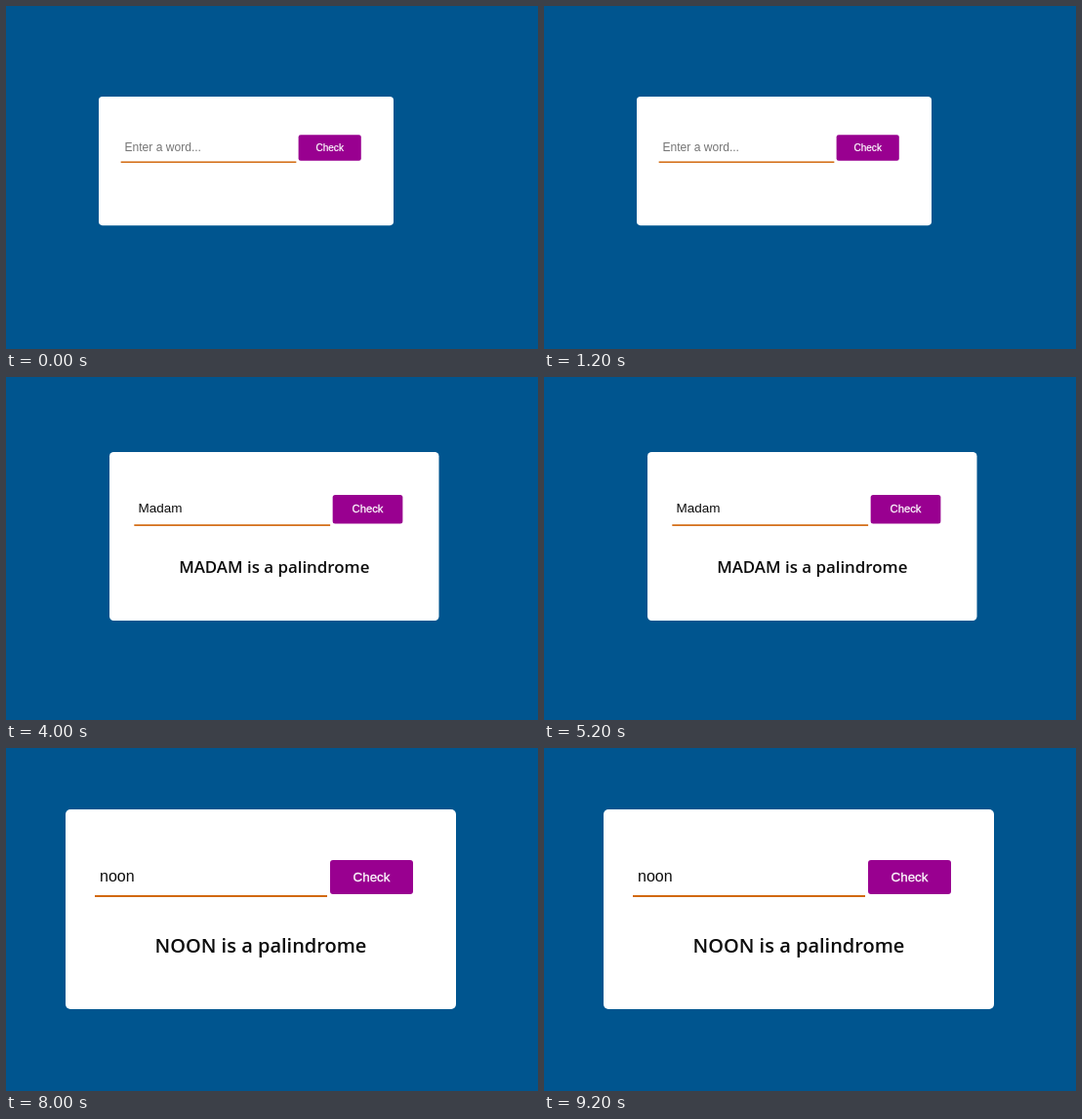
These frames come from a looping animation (545x352 px, 10 s). An HTML page:

```html
<!DOCTYPE html>
<html lang="en">
<head>
<meta charset="utf-8">
<title>Palindrome checker</title>
<style>
  html, body { margin: 0; width: 100%; height: 100%; overflow: hidden; background: #00558f; }
  svg { display: block; }
  text { font-family: "Liberation Sans", Arial, sans-serif; font-size: 16px; white-space: pre; }
  #button { font-size: 13.33px; fill: #fff; stroke: #fff; stroke-width: .3px; text-anchor: middle; }
  #result { font: 600 20px "Open Sans", sans-serif; fill: #0c0c0c; text-anchor: middle; }
</style>
</head>
<body>
<svg width="545" height="352" viewBox="0 0 545 352">
  <g id="card">
    <rect id="panel" width="400" height="205" rx="5" fill="#fff"/>
    <rect x="30" y="88" width="238" height="2" fill="#d2690f"/>
    <text id="word" x="35" y="74"></text>
    <rect id="caret" x="88" y="59" width="1" height="18"/>
    <rect x="271" y="52" width="85" height="35" rx="3" fill="#990090"/>
    <text id="button" x="313.5" y="74">Check</text>
    <text id="result" x="200" y="147"></text>
  </g>
</svg>
<script>
const HOLD = 2000;
const slides = [
  { x: 95, y: 93, width: 302, word: "" },
  { x: 78, y: 82.8, width: 381, word: "Madam", typing: true },
  { x: 106, y: 77, width: 337.5, word: "Madam" },
  { x: 83.4, y: 67.5, width: 386, word: "Madame" },
  { x: 61, y: 63, width: 400, word: "noon" }
];
const $ = id => document.getElementById(id);
let shown = -1;

function verdict(word) {
  const upper = word.toUpperCase();
  const same = upper === [...upper].reverse().join("");
  return `${upper} is ${same ? "" : "NOT "}a palindrome`;
}

function show({ x, y, width, word, typing }) {
  const checked = word && !typing;
  $("card").setAttribute("transform", `translate(${x} ${y}) scale(${width / 400})`);
  $("panel").setAttribute("height", checked ? 205 : 175);
  $("word").textContent = word || "Enter a word...";
  $("word").setAttribute("fill", word ? "#0c0c0c" : "#757575");
  $("caret").setAttribute("visibility", typing ? "visible" : "hidden");
  $("result").textContent = checked ? verdict(word) : "";
}

function tick() {
  const index = Math.floor(performance.now() / HOLD) % slides.length;
  if (index !== shown) show(slides[shown = index]);
  requestAnimationFrame(tick);
}
tick();
</script>
</body>
</html>
```
